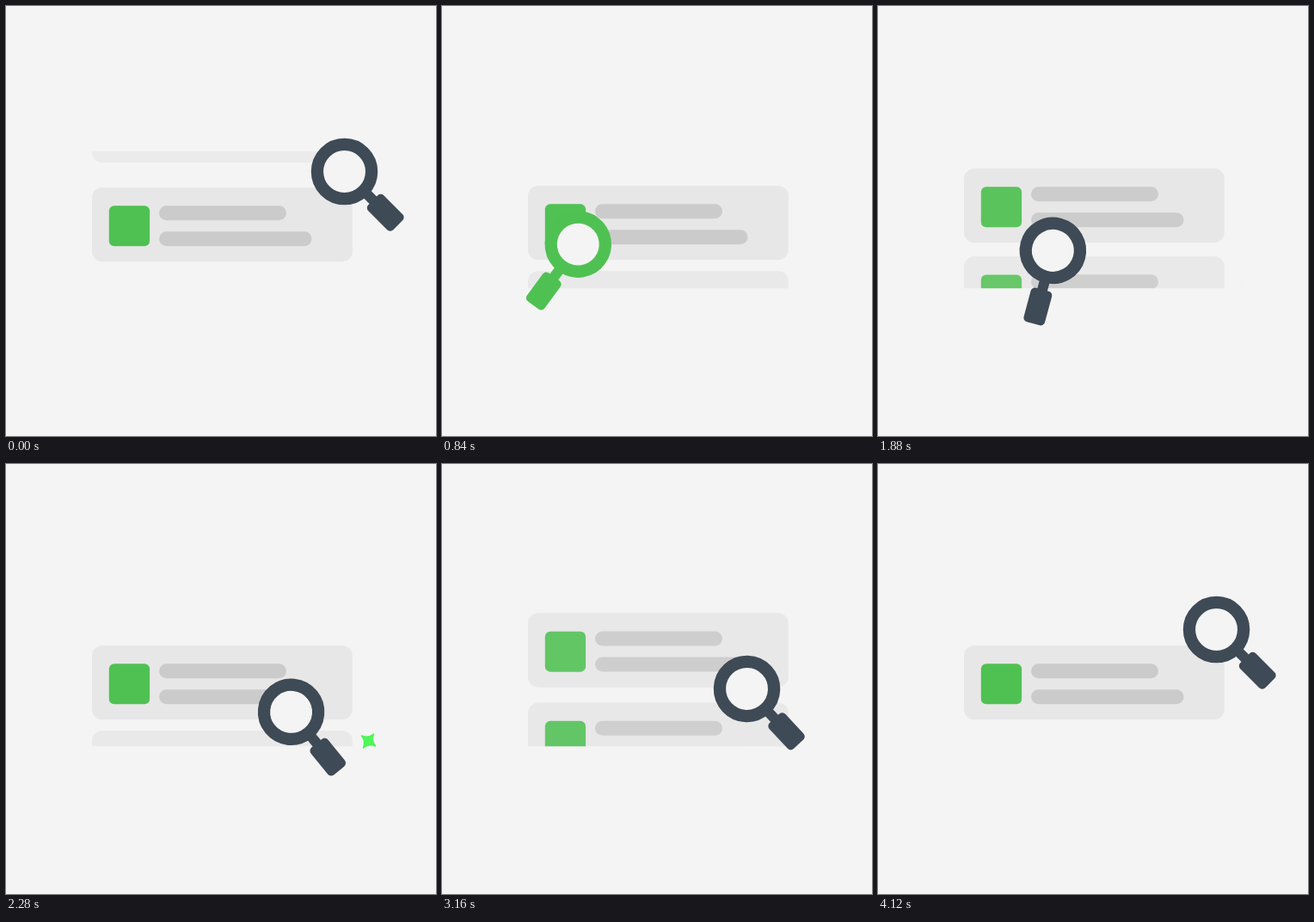
Recreate the animation shown at these times as an HTML page with a canvas. Size 500 by 500 pixels, loop 4.2 s.

```html
<!DOCTYPE html>
<html lang="en">
<head>
<meta charset="utf-8">
<title>Search</title>
<style>
html, body { margin: 0; height: 100%; overflow: hidden; background: #f4f4f4; }
canvas { display: block; width: 500px; height: 500px; }
</style>
</head>
<body>
<canvas id="stage" width="500" height="500"></canvas>
<script>
const ctx = document.getElementById('stage').getContext('2d');
const LOOP = 4200;
const BG = '#f4f4f4', CARD = '#e7e7e7', BAR = '#cbcbcb', GREEN = '#4fc152', DARK = '#3e4a56';

// Resting poses of the magnifier: pivot x, pivot y, handle angle
const poses = [[410.5, 209.5, 45], [109, 307.9, 137], [355, 306.9, 47.8], [410.5, 209.5, 45]];
const moveStarts = [-73, 1237, 2552], MOVE = 1400;
const scrollStarts = [-99, 1155, 2503], SCROLL = 1196;
const sparkles = [
  { x: 59, y: 296, start: 830, life: 1040 },
  { x: 421.5, y: 322, start: 1870, life: 1040 },
  { x: 322, y: 170, start: 3410, life: 700 }
];

const clamp = v => Math.min(1, Math.max(0, v));
const quart = u => u < 0.5 ? 8 * u ** 4 : 1 - 8 * (1 - u) ** 4;
const progress = (t, start, length) => quart(clamp((t - start) / length));

function box(x, y, w, h, r, color) {
  ctx.fillStyle = color;
  ctx.beginPath();
  ctx.roundRect(x, y, w, h, r);
  ctx.fill();
}

function iconColor(k) {
  const mix = (a, b) => Math.round(a + (b - a) * k);
  return `rgb(${mix(172, 79)},${mix(176, 193)},${mix(174, 82)})`;
}

function card(dy, alpha, icon) {
  ctx.save();
  ctx.globalAlpha = alpha;
  ctx.translate(0, dy);
  box(100, 211, 302.8, 86.3, 12, CARD);
  box(119.8, 232.3, 47.3, 47, 6, icon);
  box(178, 232.2, 148, 17, 8.5, BAR);
  box(178, 262.2, 177.5, 17, 8.5, BAR);
  ctx.restore();
}

function list(t) {
  ctx.save();
  ctx.beginPath();
  ctx.rect(90, 169, 320, 159.3);
  ctx.clip();
  const start = scrollStarts.findLast(s => t >= s);
  const p = progress(t, start, SCROLL);
  if (p < 1) card(99 * p, 1 - 0.2 * p, GREEN);
  card(-115 * (1 - p), 0.6 + 0.4 * p, iconColor(clamp(p * 2 - 0.1)));
  ctx.restore();
}

function sparkle({ x, y, start, life }, t) {
  const age = t - start;
  if (age <= 0 || age >= life) return;
  const size = clamp(age / 350);
  ctx.save();
  ctx.translate(x, y);
  ctx.rotate(age / 1000 * Math.PI / 2);
  ctx.scale(size, size);
  ctx.globalAlpha = clamp((life - age) / (life * 0.47));
  ctx.fillStyle = ctx.strokeStyle = '#4ef65a';
  ctx.lineJoin = 'round';
  ctx.beginPath();
  ctx.moveTo(0, -10);
  for (const [cx, cy, px, py] of [[2, -2, 10, 0], [2, 2, 0, 10], [-2, 2, -10, 0], [-2, -2, 0, -10]])
    ctx.quadraticCurveTo(cx, cy, px, py);
  ctx.closePath();
  ctx.fill();
  ctx.lineWidth = 1.6;
  ctx.stroke();
  ctx.restore();
}

function magnifier(t) {
  const steps = moveStarts.map(s => progress(t, s, MOVE));
  const [x, y, angle] = poses[0].map((v, i) =>
    steps.reduce((sum, p, k) => sum + (poses[k + 1][i] - poses[k][i]) * p, v));
  const color = t >= 800 && t < 1240 ? GREEN : DARK;
  ctx.save();
  ctx.translate(x, y);
  ctx.rotate(angle * Math.PI / 180);
  ctx.translate(-24, 0); // the pivot lies along the handle
  box(34, -6, 18, 12, 0, color);
  box(47, -12.7, 41, 25.4, 5, color);
  ctx.beginPath();
  ctx.arc(0, 0, 31.6, 0, 2 * Math.PI);
  ctx.fillStyle = BG;
  ctx.fill();
  ctx.strokeStyle = color;
  ctx.lineWidth = 14.3;
  ctx.stroke();
  ctx.restore();
}

function draw() {
  const t = performance.now() % LOOP;
  ctx.fillStyle = BG;
  ctx.fillRect(0, 0, 500, 500);
  list(t);
  sparkles.forEach(s => sparkle(s, t));
  magnifier(t);
  requestAnimationFrame(draw);
}
draw();
</script>
</body>
</html>
```
